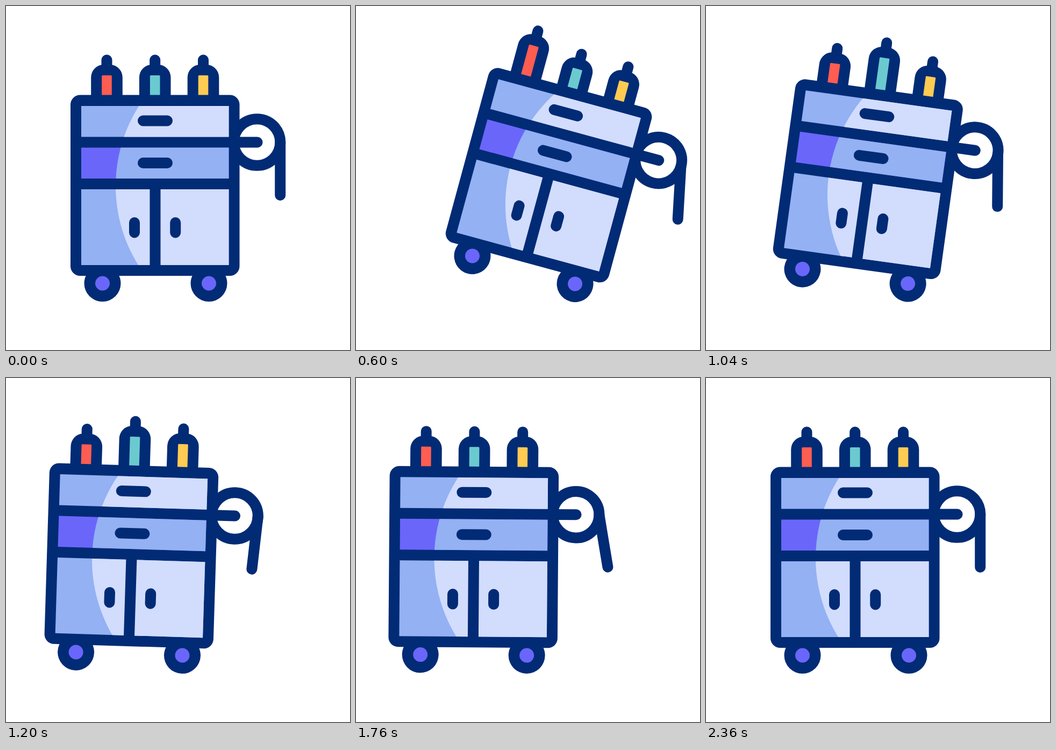
An HTML page for the animation above (2440 ms loop, 640 by 640 pixels).

```html
<!DOCTYPE html>
<html lang="en">
<head>
<meta charset="utf-8">
<title>Rolling tool cart</title>
<style>
  html, body { margin: 0; height: 100%; overflow: hidden; background: #fff; }
  svg { display: block; width: 100vw; height: 100vh; }
  .line { fill: none; stroke: #022b75; stroke-width: 20; stroke-linecap: round; }
  .navy { fill: #022b75; }
  .light { fill: #d2dcfd; }
  .mid { fill: #93b1f3; }
  .violet { fill: #6a66fa; }
</style>
</head>
<body>
<svg viewBox="0 0 640 640">
  <clipPath id="lit"><circle cx="482" cy="335" r="278"/></clipPath>
  <g id="cart">
    <circle class="line" cx="467" cy="253.5" r="43.3"/>
    <path id="strip" class="line" d="M510.2 253.5V352"/>
    <g id="bottles"></g>
    <g id="wheels"></g>
    <rect class="navy" x="120" y="165.5" width="314.5" height="336.5" rx="18"/>
    <g class="mid">
      <path d="M140 186H414.5V243.5H140Z"/>
      <path class="violet" d="M140 263.5H414.5V321H140Z"/>
      <path d="M140 341H414.5V482H140Z"/>
    </g>
    <g class="light" clip-path="url(#lit)">
      <path d="M140 186H414.5V243.5H140Z"/>
      <path class="mid" d="M140 263.5H414.5V321H140Z"/>
      <path d="M140 341H414.5V482H140Z"/>
    </g>
    <path class="line" d="M277.5 335V490M255 213.5H300M255 292H300M239 403V421.5M315.2 403V421.5M425 253.5H467.5"/>
  </g>
</svg>
<script>
const $ = id => document.getElementById(id);
const LOOP = 2440, STEP = 40;
const pivot = [374, 516];

// Each track is a list of [time in ms, value].
const shift = [[128, 0], [725, 32], [1470, -72], [2350, 0]];
const tilt = [[135, 0], [715, 16], [1350, 0.6], [2350, 0]];
const swing = [[240, 0], [800, -15], [1360, 7.5], [1800, -10], [2350, 0]];
const bottles = [
  { x: 187.5, color: '#ff5d52', start: 340 },
  { x: 277.2, color: '#6bcad0', start: 700 },
  { x: 367, color: '#ffcb52', start: 1060 }
];

// Cubic bezier (.58, 0, .42, 1), solved by bisection.
function ease(x) {
  let lo = 0, hi = 1;
  for (let i = 0; i < 24; i++) {
    const s = (lo + hi) / 2, r = 1 - s;
    if (1.74 * s * r * r + 1.26 * s * s * r + s * s * s < x) lo = s;
    else hi = s;
  }
  return lo * lo * (3 - 2 * lo);
}

function valueAt(keys, t) {
  if (t <= keys[0][0]) return keys[0][1];
  for (let i = 1; i < keys.length; i++) {
    const [t0, a] = keys[i - 1], [t1, b] = keys[i];
    if (t < t1) return a + (b - a) * ease((t - t0) / (t1 - t0));
  }
  return keys[keys.length - 1][1];
}

for (const b of bottles) {
  b.keys = [[b.start, 0], [b.start + 360, 23], [b.start + 720, 0]];
  $('bottles').insertAdjacentHTML('beforeend',
    `<g><path class="line"/><path class="navy"/><path fill="${b.color}"/></g>`);
  b.parts = $('bottles').lastChild.children;
}

for (const x of [179.5, 377.5]) {
  $('wheels').insertAdjacentHTML('beforeend',
    `<circle class="navy" cx="${x}" cy="516" r="34"/><circle class="violet" cx="${x}" cy="516" r="13.5"/>`);
}

function drawBottle({ x, keys, parts }, t) {
  const top = 109 - valueAt(keys, t);
  const [tip, body, fill] = parts;
  tip.setAttribute('d', `M${x} ${top - 8.5}V${top + 8}`);
  body.setAttribute('d',
    `M${x - 29.3} 180V${top + 24}a24 24 0 0 1 24 -24h10.6a24 24 0 0 1 24 24V180Z`);
  fill.setAttribute('d',
    `M${x - 9.3} 168V${top + 21.5}q0 -1.5 1.5 -1.5h15.6q1.5 0 1.5 1.5V168Z`);
}

function draw(now) {
  const t = Math.floor(now % LOOP / STEP) * STEP;
  $('cart').setAttribute('transform',
    `translate(${valueAt(shift, t)}) rotate(${valueAt(tilt, t)} ${pivot})`);
  $('strip').setAttribute('transform', `rotate(${valueAt(swing, t)} 510.2 253.5)`);
  for (const b of bottles) drawBottle(b, t);
}

const begin = performance.now();
function tick() {
  draw(performance.now() - begin);
  requestAnimationFrame(tick);
}
tick();
</script>
</body>
</html>
```
